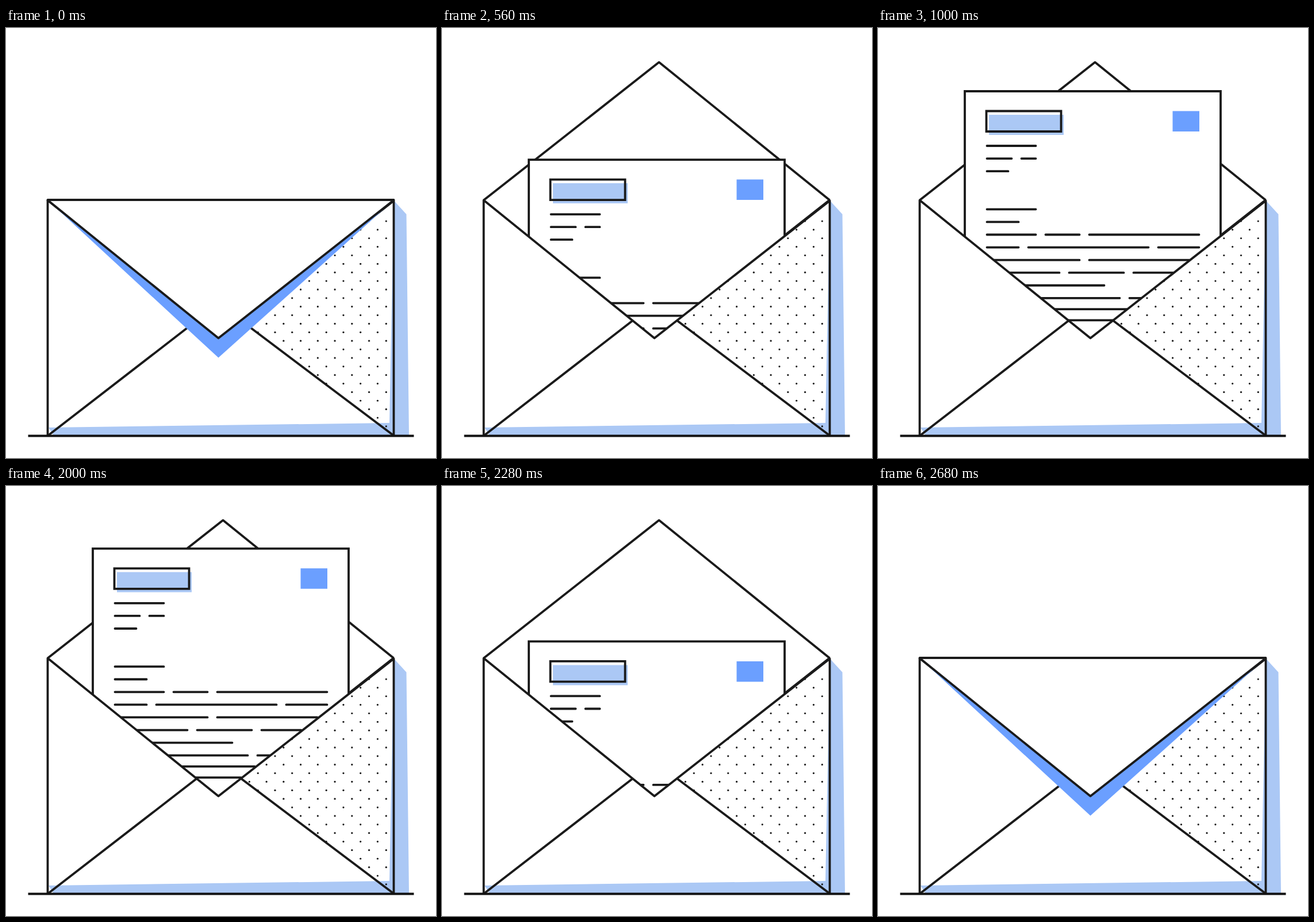
An HTML page for the animation above (3.84 s loop, 748 by 748 pixels).

```html
<!DOCTYPE html>
<html lang="en">
<head>
<meta charset="utf-8">
<title>Envelope</title>
<style>
  html, body { margin: 0; width: 100%; height: 100%; overflow: hidden; background: #fff; }
  svg { display: block; width: 100vw; height: 100vh; }
  .ink { stroke: #1a1a1a; stroke-width: 3.8; stroke-linejoin: round; }
  .sharp { stroke-linejoin: miter; }
  .round { stroke-linecap: round; }
  .paper { fill: #fff; }
  .none { fill: none; }
  .pale { fill: #abc8f5; }
  .blue { fill: #6b9fff; }
</style>
</head>
<body>
<svg viewBox="0 0 748 748">
  <defs>
    <clipPath id="side"><path d="M674.5 299L409 509L674.5 709Z"/></clipPath>
    <clipPath id="aboveTip"><path d="M0 0H748V545H0Z"/></clipPath>
  </defs>

  <path id="openFlap" class="ink paper"/>
  <path class="ink none" d="M674.5 299L597 360"/>

  <g clip-path="url(#aboveTip)">
    <g id="letter">
      <path class="ink paper sharp" d="M151 0H596V470H151Z"/>
      <path class="pale" d="M193 41H323V76H193Z"/>
      <path class="ink none sharp" d="M188.5 34.5H318.5V70H188.5Z"/>
      <path class="blue" d="M512.5 34.5H559V70H512.5Z"/>
      <path id="text" class="ink none round"/>
    </g>
  </g>

  <path class="paper" d="M72.5 299.6L369.5 539.6L674.5 300.4V709H72.5Z"/>
  <path class="pale" d="M74 695L667 687L674.5 300L696.5 324L701 709H83Z"/>
  <g id="dots" fill="#1a1a1a" clip-path="url(#side)"></g>
  <path class="ink none" d="M73 709L331 509.5M409 509L674.5 709"/>
  <path class="ink none" d="M72.5 709V299.6L369.5 539.6L674.5 300.4V709"/>

  <path id="flapShade" class="blue"/>
  <path id="shutFlap" class="ink paper"/>
  <path class="none" stroke="#111" stroke-width="3.8" d="M38.5 709.5H709.5"/>
</svg>

<script>
const LOOP = 3840, STEP = 40;
const FOLD = 299.6, REACH = 240, SHADE = 274;
const $ = id => document.getElementById(id);

// Text lines fill from the margin; each number is where a dash ends.
const MARGIN = 188, GAP = 16, END = 560;
const lines = [
  [276], [234, 276], [228], [], [],
  [276], [246, 0], [276, 352, END], [246, 472, END], [352, 543],
  [317, 429, 515], [395], [422, END], [434, END], [410, END], [], [352, END]
];

function dashes(ends, i) {
  const y = 95 + 22.07 * i - 2.8 * Math.max(0, i - 12);
  let x = MARGIN, d = "";
  for (const end of ends.filter(Boolean)) {
    d += `M${x + 1.5} ${y}H${end - 1.5}`;
    x = end + GAP - 2;
  }
  return d;
}
$("text").setAttribute("d", lines.map(dashes).join(""));

// Staggered dot grid, trimmed to the right panel.
const PITCH = 14.87;
for (let r = 0; r < 25; r++)
  for (let c = r % 2; c < 17; c += 2) {
    const dot = document.createElementNS("http://www.w3.org/2000/svg", "circle");
    dot.setAttribute("cx", 661.3 - c * PITCH);
    dot.setAttribute("cy", 336 + r * PITCH);
    dot.setAttribute("r", 1.6);
    $("dots").append(dot);
  }

// Progress from 0 to 1 between two times.
const span = (t, from, to) => Math.min(1, Math.max(0, (t - from) / (to - from)));

// Same curve as the CSS keyword ease-in-out.
function ease(p) {
  let lo = 0, hi = 1, s = 0.5;
  for (let i = 0; i < 24; i++) {
    s = (lo + hi) / 2;
    const x = 1.26 * s * (1 - s) ** 2 + 1.74 * s * s * (1 - s) + s ** 3;
    if (x < p) lo = s; else hi = s;
  }
  return s * s * (3 - 2 * s);
}

// Letter rises past its rest, settles, lifts a little and drops back in.
function letterTop(t) {
  return 335
    - 251 * ease(span(t, 360, 800)) + 26 * ease(span(t, 800, 1000))
    - 5 * ease(span(t, 1960, 2080)) + 230 * ease(span(t, 2080, 2396));
}

// Half turns of the flap: 0 is shut, 1 is open.
function flapTurn(t) {
  return span(t, 0, 240) - (span(t, 2400, 2520) + span(t, 2520, 2680)) / 2;
}

const wedge = (x, y) => `M72.5 ${FOLD}L${x} ${y}L674.5 ${FOLD}`;

function render(t) {
  const k = Math.cos(flapTurn(t) * Math.PI);
  const flap = wedge(373.5 - 4 * k, FOLD + REACH * k);
  const shut = k > -0.001;
  $("openFlap").setAttribute("d", shut ? "" : flap);
  $("flapShade").setAttribute("d", shut ? wedge(373.5 - 4 * k, FOLD + SHADE * k) : "");
  $("shutFlap").setAttribute("d", shut ? flap + "V299H72.5Z" : "");
  $("letter").setAttribute("transform", `translate(0 ${letterTop(t)})`);
}

function tick() {
  render(Math.floor(performance.now() % LOOP / STEP) * STEP);
  requestAnimationFrame(tick);
}
tick();
</script>
</body>
</html>
```
